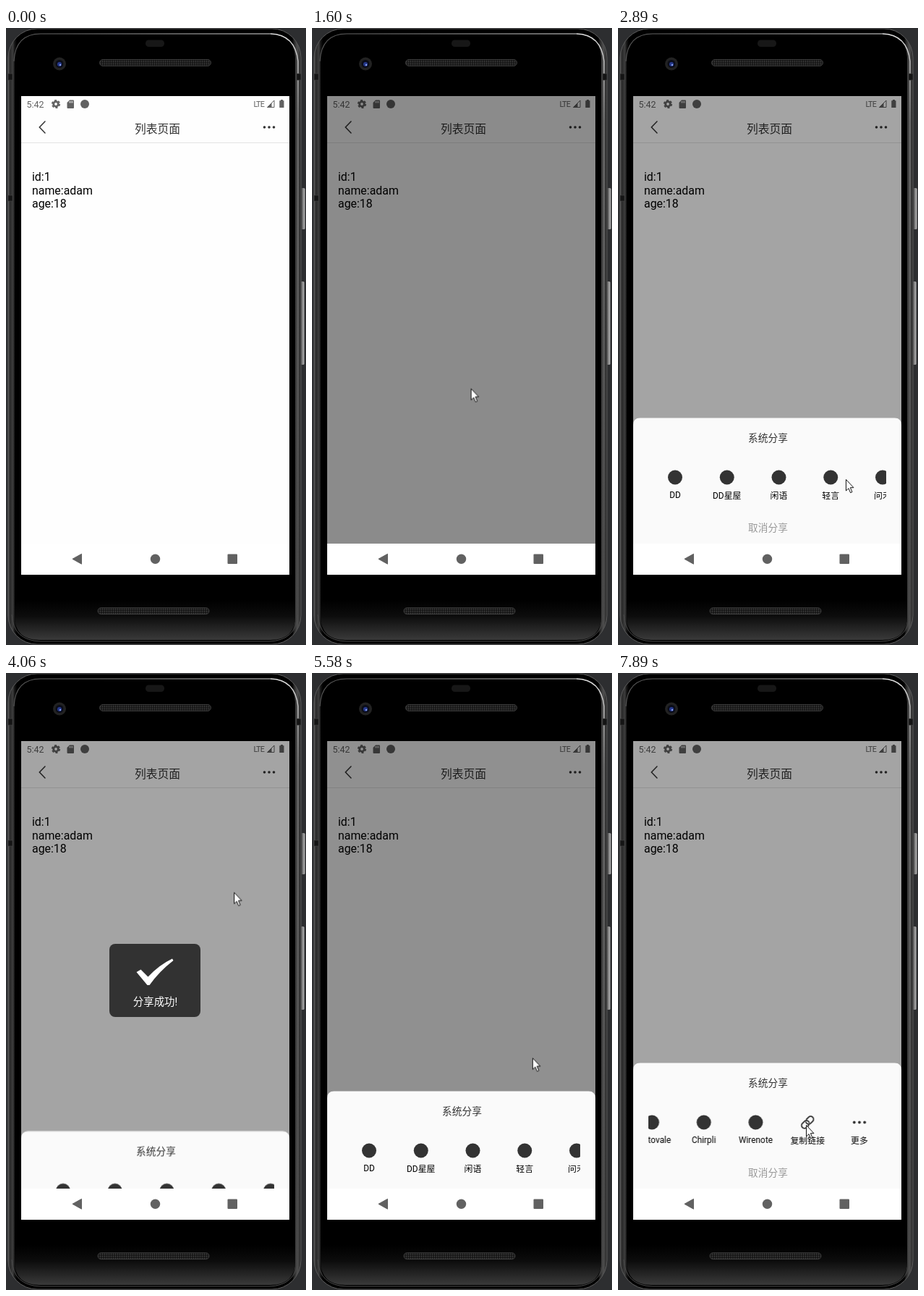
An HTML page that plays this animation: 415x852 px, repeating every 8 s.

```html
<!DOCTYPE html>
<html lang="zh-CN">
<head>
<meta charset="utf-8">
<title>Share sheet</title>
<style>
html, body { margin: 0; width: 100%; height: 100%; overflow: hidden; background: #2d2e30; }
svg { display: block; width: 415px; height: 852px; }
text { font-family: Roboto, "Noto Sans CJK SC", "Noto Sans CJK", sans-serif; }
.mid { text-anchor: middle; }
.line { fill: none; stroke: #333; stroke-width: 1.5; stroke-linecap: round; }

#mask, #sheet, #list, #toast, #cursor { animation: 8s linear infinite; }
#mask { animation-name: mask; }
#sheet { animation-name: sheet; }
#list { animation-name: list; }
#toast { animation-name: toast; }
#cursor { animation-name: cursor; }

@keyframes mask {
  0%, 18% { opacity: 0; }
  19.625%, 22.5% { opacity: .455; }
  25.75%, 51.9% { opacity: .355; }
  55%, 64.625% { opacity: 0; }
  66.25%, 69.125% { opacity: .455; }
  72.375%, 100% { opacity: .355; }
}
@keyframes sheet {
  0% { transform: translateY(176px); }
  20.5% { transform: translateY(176px); animation-timing-function: cubic-bezier(.39,.575,.565,1); }
  25.4%, 48% { transform: translateY(0); }
  53.15% { transform: translateY(176px); }
  67.125% { transform: translateY(176px); animation-timing-function: cubic-bezier(.39,.575,.565,1); }
  72.025%, 100% { transform: translateY(0); }
}
@keyframes list {
  0%, 80.25% { transform: translateX(0); }
  86.875% { transform: translateX(-305px); animation-timing-function: ease-out; }
  90.125%, 90.875% { transform: translateX(-378px); animation-timing-function: ease-out; }
  93.5%, 100% { transform: translateX(-390.75px); }
}
@keyframes toast {
  0%, 46% { opacity: 0; }
  48.5%, 55.875% { opacity: 1; }
  59%, 100% { opacity: 0; }
}
@keyframes cursor {
  0%, 3.74% { transform: translate(430px, 149px); }
  3.75% { transform: translate(407px, 149px); animation-timing-function: ease-out; }
  10.25%, 18% { transform: translate(363px, 139px); }
  20% { transform: translate(220px, 497px); animation-timing-function: ease-out; }
  26%, 28.625% { transform: translate(111px, 656px); }
  32.375%, 36.1% { transform: translate(321px, 622px); }
  36.125% { transform: translate(315px, 623px); }
  41%, 45.625% { transform: translate(290px, 623px); }
  50.75% { transform: translate(315px, 303px); }
  55.125%, 55.875% { transform: translate(372px, 152px); }
  61.5%, 64.625% { transform: translate(363px, 137px); }
  69.75% { transform: translate(305px, 531px); }
  74.375%, 75.125% { transform: translate(231px, 658px); }
  78.375%, 80.25% { transform: translate(335px, 624px); }
  86.875%, 90.875% { transform: translate(30px, 630px); }
  93.5%, 96.375% { transform: translate(245px, 614px); }
  98.625%, 100% { transform: translate(260px, 624px); }
}
</style>
</head>
<body>
<svg viewBox="0 0 415 852">
  <defs>
    <linearGradient id="rim">
      <stop offset="0" stop-color="#585858"/><stop offset=".006" stop-color="#2a2a2a"/>
      <stop offset=".016" stop-color="#3c3c3c"/><stop offset=".022" stop-color="#161616"/>
      <stop offset=".03" stop-color="#000"/><stop offset=".97" stop-color="#000"/>
      <stop offset=".978" stop-color="#2c2c2c"/><stop offset=".988" stop-color="#505050"/>
      <stop offset="1" stop-color="#242424"/>
    </linearGradient>
    <linearGradient id="chin" x2="0" y2="1">
      <stop offset="0" stop-color="#000"/><stop offset=".4" stop-color="#0c0c0c"/>
      <stop offset="1" stop-color="#3a3a3a"/>
    </linearGradient>
    <linearGradient id="shine">
      <stop offset="0" stop-color="#555"/><stop offset=".5" stop-color="#999"/>
      <stop offset="1" stop-color="#e4e4e4"/>
    </linearGradient>
    <linearGradient id="fade" x2="0" y2="1">
      <stop offset="0" stop-color="#ddd"/><stop offset=".15" stop-color="#777"/>
      <stop offset="1" stop-color="#444"/>
    </linearGradient>
    <linearGradient id="key">
      <stop offset="0" stop-color="#333"/><stop offset=".6" stop-color="#8c8c8c"/>
      <stop offset="1" stop-color="#bbb"/>
    </linearGradient>
    <pattern id="mesh" width="3" height="3" patternUnits="userSpaceOnUse">
      <rect width="3" height="3" fill="#151515"/><circle cx="1.5" cy="1.5" r=".9" fill="#404040"/>
    </pattern>
    <clipPath id="page"><rect x="21" y="94" width="371" height="618"/></clipPath>
    <clipPath id="strip"><rect x="42" y="600" width="328.5" height="62"/></clipPath>
  </defs>

  <!-- phone body -->
  <rect width="415" height="852" fill="#2d2e30"/>
  <rect x="3" y="1" width="405" height="850" rx="40" fill="url(#rim)" stroke="#5c5c5c"/>
  <rect x="408" y="221" width="5.5" height="57" rx="1.5" fill="url(#key)"/>
  <rect x="407" y="350" width="5.5" height="115" rx="1.5" fill="url(#key)"/>
  <path d="M12 40Q14 9 46 9H366Q397 9 400 40V812Q400 845 366 845H46Q12 845 12 812Z"/>
  <path d="M12 790H400V812Q400 845 366 845H46Q12 845 12 812Z" fill="url(#chin)"/>
  <path d="M11 46Q13 8 48 8H366" fill="none" stroke="url(#shine)" stroke-width="1.2"/>
  <path d="M366 8Q400 9 404 46V810" fill="none" stroke="url(#fade)" stroke-width="1.5"/>
  <path d="M8 810Q10 846 48 847H364Q401 846 404 810" fill="none" stroke="#4a4a4a"/>
  <path d="M3 63h6v9H3ZM402 63h6v9h-6ZM3 231h6v8H3Z" fill="#151515" stroke="#444" stroke-width=".6"/>
  <rect x="193" y="16.500" width="26" height="9.500" rx="4.500" fill="#171717"/>
  <rect x="129.500" y="43.500" width="154" height="9" rx="4.500" fill="url(#mesh)" stroke="#404040" stroke-width=".8"/>
  <rect x="127" y="800.500" width="154" height="9" rx="4.500" fill="url(#mesh)" stroke="#404040" stroke-width=".8"/>
  <circle cx="74" cy="49.500" r="9" fill="#222"/>
  <circle cx="74" cy="49.500" r="5.500" fill="#0b0d18"/>
  <circle cx="74" cy="50" r="3" fill="#26398c"/>
  <circle cx="75" cy="51" r="1.200" fill="#8ea4ee"/>

  <!-- page -->
  <rect x="21" y="94" width="371" height="661" fill="#fefefe"/>
  <g fill="#616161">
    <text x="28.500" y="110" font-size="12.500">5:42</text>
    <circle cx="69" cy="105" r="3.300" fill="none" stroke="#616161" stroke-width="2.800"/>
    <circle cx="69" cy="105" r="5.200" fill="none" stroke="#616161" stroke-width="1.800" stroke-dasharray="3 2.445"/>
    <path d="M88 99.500H93Q94 99.500 94 100.500V110Q94 111 93 111H85.500Q84.500 111 84.500 110V103Z"/>
    <path d="M88 101v2.500M90 101v2.500M92 101v2.500" stroke="#fefefe" stroke-width=".9"/>
    <circle cx="109" cy="105" r="6"/>
    <text x="342.500" y="109" font-size="10.800" letter-spacing="-.8">LTE</text>
    <path d="M361.500 109.500L371 100V109.500Z" fill="none" stroke="#616161"/>
    <path d="M361 110L367.500 103.500V110Z"/>
    <path d="M380 99h3v1.300h1.500V110H378.300V100.300H380Z"/>
  </g>
  <path class="line" d="M54 129L46.300 137L54 145"/>
  <text class="mid" x="209.500" y="145" font-size="15.800" fill="#333">列表页面</text>
  <g fill="#333"><circle cx="357.500" cy="137" r="1.800"/><circle cx="364" cy="137" r="1.800"/><circle cx="370.500" cy="137" r="1.800"/></g>
  <path d="M21 158.500H392" stroke="#e3e3e3"/>
  <g font-size="15.900">
    <text x="36" y="211">id:1</text>
    <text x="36" y="229.500">name:adam</text>
    <text x="36" y="248">age:18</text>
  </g>

  <g clip-path="url(#page)">
    <rect id="mask" x="21" y="94" width="371" height="618"/>
    <g id="sheet">
      <path d="M21 720V548Q21 538.500 30.500 538.500H382.500Q392 538.500 392 548V720Z" fill="#fafafa"/>
      <text class="mid" x="207.500" y="571" font-size="13.700" fill="#333">系统分享</text>
      <g clip-path="url(#strip)"><g id="list"></g></g>
      <text class="mid" x="207.500" y="695" font-size="13.700" fill="#999">取消分享</text>
    </g>
    <g id="toast">
      <rect x="143" y="374" width="126" height="101" rx="8" fill="#323232"/>
      <path d="M180.500 413L186.500 409.500L196.500 419.500Q212 403 230 394.500L231.500 397Q212 412 198.500 431H195.500Z" fill="#fff"/>
      <text class="mid" x="206.500" y="459" font-size="14.400" fill="#fff">分享成功!</text>
    </g>
  </g>

  <!-- navigation bar -->
  <rect x="21" y="712" width="371" height="43" fill="#fff"/>
  <g fill="#616161">
    <path d="M92 733.200L104.500 726.300V740.200Z" stroke="#616161" stroke-linejoin="round"/>
    <circle cx="206.500" cy="733.300" r="6.700"/>
    <rect x="306.500" y="726.500" width="13.500" height="13.500" rx="1"/>
  </g>

  <path id="cursor" d="M.5 .5V16L4 12.700L6.600 18.700L9 17.700L6.400 11.700H11Z" fill="#fff" stroke="#111" stroke-width="1"/>
</svg>
<script>
const labels = ["DD", "DD星屋", "闲语", "轻言", "问禾", "Photovale", "Chirpli", "Wirenote", "复制链接", "更多"];
const icons = {
  "复制链接": x => `<g class="line" style="stroke-width:1.9" transform="translate(${x} 620.5) rotate(-45)">
    <path d="M-2 4H-6A4 4 0 0 1 -6 -4H-2A4 4 0 0 1 1.5 1.5M2 -4H6A4 4 0 0 1 6 4H2A4 4 0 0 1 -1.5 -1.5"/></g>`,
  "更多": x => [-7.2, 0, 7.2].map(d => `<circle cx="${x + d}" cy="620.5" r="1.9" fill="#333"/>`).join("")
};
const disc = x => `<circle cx="${x}" cy="620.5" r="10" fill="#333"/>`;

document.getElementById("list").innerHTML = labels.map((label, i) => {
  const x = 79 + 71.75 * i;
  const y = /^[A-Za-z]+$/.test(label) ? 649 : 650;
  return (icons[label] || disc)(x) + `<text class="mid" x="${x}" y="${y}" font-size="11.9">${label}</text>`;
}).join("");
</script>
</body>
</html>
```
